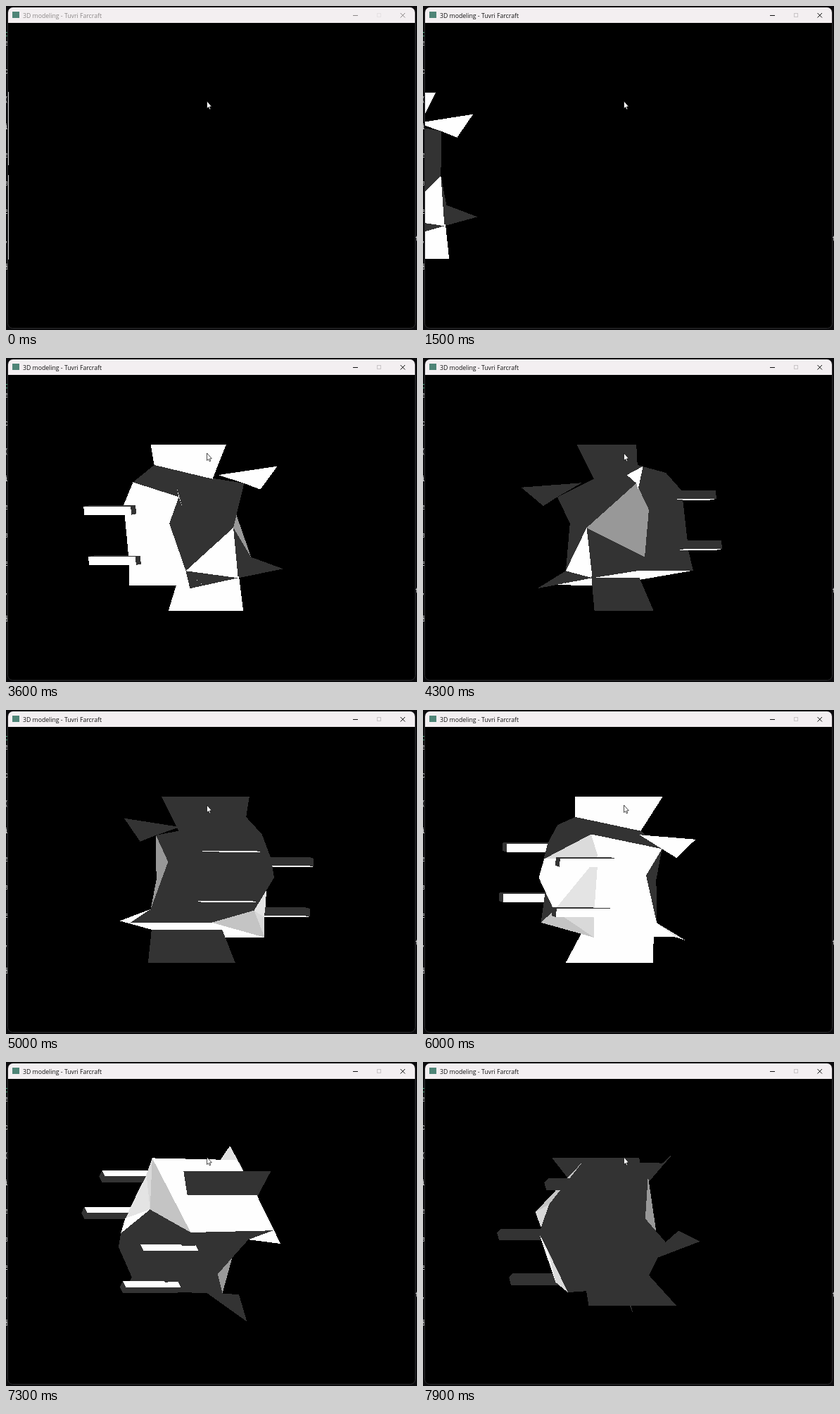
An HTML page with a canvas that plays this animation: 584x460 px, repeating every 8000 ms.

```html
<!DOCTYPE html>
<html>
<head>
<meta charset="utf-8">
<style>
html, body { margin: 0; width: 100%; height: 100%; overflow: hidden; background: #000; }
canvas { display: block; width: 584px; height: 460px; }
</style>
</head>
<body>
<canvas id="stage" width="584" height="460"></canvas>
<script>
const g = document.getElementById('stage').getContext('2d');
const LOOP = 8000, DEG = Math.PI / 180;
const VIEW = { x: 3, y: 110, w: 578, h: 262 };
const clamp = (v, lo, hi) => Math.max(lo, Math.min(hi, v));
// whole 100 ms steps taken since a start time
const steps = (t, start, max) => clamp(Math.floor((t - start) / 100) + 1, 0, max);

// Ship model. A point is [length, height (down), width]; the nose points to +length.
const tris = [];
function face(pts, shade) {
  for (let i = 2; i < pts.length; i++) tris.push({ pts: [pts[0], pts[i - 1], pts[i]], shade });
}

function box([l0, h0, w0], [l1, h1, w1]) {
  for (const h of [h0, h1]) face([[l0, h, w0], [l1, h, w0], [l1, h, w1], [l0, h, w1]]);
  for (const w of [w0, w1]) face([[l0, h0, w], [l1, h0, w], [l1, h1, w], [l0, h1, w]]);
  for (const l of [l0, l1]) face([[l, h0, w0], [l, h1, w0], [l, h1, w1], [l, h0, w1]]);
}

const nose = [68, 0, 0], brow = [37, -70, 0], chin = [68, 72, 0];
const spine = [[-72, -90, 0], [-118, -30, 0], [-125, -3, 0], [-96, 44, 0]];

function half(s) {
  const at = (l, h, w) => [l, h, w * s];
  const cheek = at(33, -54, 70), notch = at(10, -16, 70), jaw = at(33, 52, 70);
  const roof = at(-72, -72, 48), hip = at(-72, -43, 72), heel = at(-72, 44, 72);
  const toe = at(65, 72, 72), tail = at(-72, 72, 76);
  face([nose, cheek, notch, jaw], s > 0 ? 0.2 : 0.6);
  face([nose, brow, cheek]);
  face([nose, jaw, chin]);
  face([brow, spine[0], roof, cheek]);
  face([cheek, roof, hip]);
  face([notch, cheek, hip, heel, jaw]);
  face([jaw, heel, tail, toe]);
  face([jaw, toe, chin]);
  face([spine[0], roof, spine[1]]);
  face([roof, hip, spine[1]]);
  face([hip, spine[1], spine[2], spine[3], heel]);
  face([heel, tail, spine[3]]);
  face([chin, toe, tail, [-72, 72, 0]]);
  face([spine[3], tail, [-72, 72, 0]]);
  face([cheek, at(12, -70, 40), at(65, -73, 108), at(50, -43, 84)]);
  face([jaw, at(65, 73, 100), chin]);
  for (const h of [-36, 36]) box(at(-140, h - 6, 70), at(-50, h + 6, 82));
}
half(1);
half(-1);
face([[-75, -119, 0], [69, -119, 0], brow, [-70, -70, 0]]);
face([[-71, 119, 0], [72, 119, 0], [70, 70, 0], [-45, 70, 0]]);

// The light is fixed to the ship: it falls on the +width side and from below.
function brightness([a, b, c], flip) {
  const u = b.map((v, i) => v - a[i]), v = c.map((q, i) => q - a[i]);
  const n = [u[1] * v[2] - u[2] * v[1], u[2] * v[0] - u[0] * v[2], u[0] * v[1] - u[1] * v[0]];
  return clamp(0.2 + 2.2 * flip * (0.4 * n[1] + n[2]) / (Math.hypot(...n) || 1), 0.2, 1);
}

const image = g.createImageData(VIEW.w, VIEW.h);
const pixels = new Uint32Array(image.data.buffer);
const depth = new Float32Array(pixels.length);

function fillTri([a, b, c], area, level) {
  const v = Math.round(level * 254), color = (0xff000000 | v * 0x10101) >>> 0;
  const xs = [a[0], b[0], c[0]], ys = [a[1], b[1], c[1]];
  const x0 = Math.max(0, Math.floor(Math.min(...xs))), x1 = Math.min(VIEW.w - 1, Math.max(...xs));
  const y0 = Math.max(0, Math.floor(Math.min(...ys))), y1 = Math.min(VIEW.h - 1, Math.max(...ys));
  for (let y = y0; y <= y1; y++)
    for (let x = x0; x <= x1; x++) {
      const px = x + 0.5, py = y + 0.5;
      const p = ((b[0] - px) * (c[1] - py) - (b[1] - py) * (c[0] - px)) / area;
      const q = ((c[0] - px) * (a[1] - py) - (c[1] - py) * (a[0] - px)) / area;
      if (p < 0 || q < 0 || p + q > 1) continue;
      const z = p * a[2] + q * b[2] + (1 - p - q) * c[2], i = y * VIEW.w + x;
      if (z > depth[i]) { depth[i] = z; pixels[i] = color; }
    }
}

function render(cx, yaw, roll) {
  const cr = Math.cos(roll), sr = Math.sin(roll), cy = Math.cos(yaw), sy = Math.sin(yaw);
  const project = ([l, h, w]) => {
    const side = w * cr + h * sr;
    return [cx + l * cy - side * sy - VIEW.x, 241 + h * cr - w * sr - VIEW.y, l * sy + side * cy];
  };
  pixels.fill(0xff000000);
  depth.fill(-1e9);
  for (const { pts, shade } of tris) {
    const [a, b, c] = pts.map(project);
    const area = (b[0] - a[0]) * (c[1] - a[1]) - (b[1] - a[1]) * (c[0] - a[0]);
    if (Math.abs(area) > 0.01) fillTri([a, b, c], area, shade || brightness(pts, -Math.sign(area) * handed));
  }
}
// model axes (length, down, width) map to a right-handed screen with z towards the viewer
const handed = -1;

let shown = '';
function ship(t) {
  const enter = steps(t, 1200, 5), slide = steps(t, 2200, 10);
  const tip = -22 + 24 * enter + 27.2 * Math.min(slide, 5)
    + 32.75 * clamp(slide - 5, 0, 4) + 15 * (slide > 9);
  const yaw = 30 + 12 * steps(t, 3600, 25), roll = -8 + 12 * steps(t, 6200, 18);
  const pose = [tip, yaw, roll].join();
  if (pose !== shown) render(tip - 107.5, yaw * DEG, roll * DEG);
  shown = pose;
  g.putImageData(image, VIEW.x, VIEW.y);
}

function line(color, ...pts) {
  g.beginPath();
  for (let i = 0; i < pts.length; i += 4) {
    g.moveTo(pts[i], pts[i + 1]);
    g.lineTo(pts[i + 2], pts[i + 3]);
  }
  g.strokeStyle = color;
  g.stroke();
}

function label(text, x, y, color, font) {
  g.font = font;
  g.fillStyle = color;
  g.fillText(text, x, y);
}

function desktop() {
  const mono = '11px "Noto Sans Mono", monospace';
  g.fillStyle = '#0b0b0d';
  g.fillRect(0, 0, 584, 460);
  label('c', -3, 43, '#4fb98a', mono);
  [...'eo(ieae,e'].forEach((c, i) => label(c, -3, 56 + 39.8 * i, '#ddd', mono));
  label('S', -3, 374, '#ddd', mono);
  label('t', 581, 334, '#ddd', mono);
  g.beginPath();
  g.roundRect(2.5, 2.5, 579, 455, 7);
  g.fillStyle = '#000';
  g.fill();
  g.strokeStyle = '#2c2c2e';
  g.stroke();
}

function titleBar(active) {
  const ink = active ? '#111' : '#8c8888';
  g.beginPath();
  g.roundRect(3, 2, 578, 22, [7, 7, 0, 0]);
  g.fillStyle = '#f3eff1';
  g.fill();
  g.fillStyle = '#4f8577';
  g.fillRect(9, 8, 10, 9);
  label('3D modeling - Tuvri Farcraft', 24, 16.5, ink, '8.7px "Open Sans", sans-serif');
  line(ink, 493, 13.5, 500, 13.5);
  line(ink, 560.5, 10, 567, 16.5, 567, 10, 560.5, 16.5);
  g.strokeStyle = active ? '#c9c5c7' : '#e6e2e4';
  g.strokeRect(527.5, 10.5, 5, 5);
}

const arrow = new Path2D('M285.5 135v10.5l2.3-1.9 1.5 3.4 1.5-.8-1.4-3.2 2.9-.2z');
function cursor() {
  g.fillStyle = '#fff';
  g.fill(arrow);
  g.lineWidth = 0.7;
  g.strokeStyle = '#000';
  g.stroke(arrow);
  g.lineWidth = 1;
}

const start = performance.now();
function draw() {
  const t = (performance.now() - start) % LOOP;
  desktop();
  ship(t);
  if (t < 500) line('#ccc', 3.5, 122, 3.5, 226, 3.5, 240, 3.5, 360);
  titleBar(t >= 500);
  cursor();
  requestAnimationFrame(draw);
}
draw();
</script>
</body>
</html>
```
